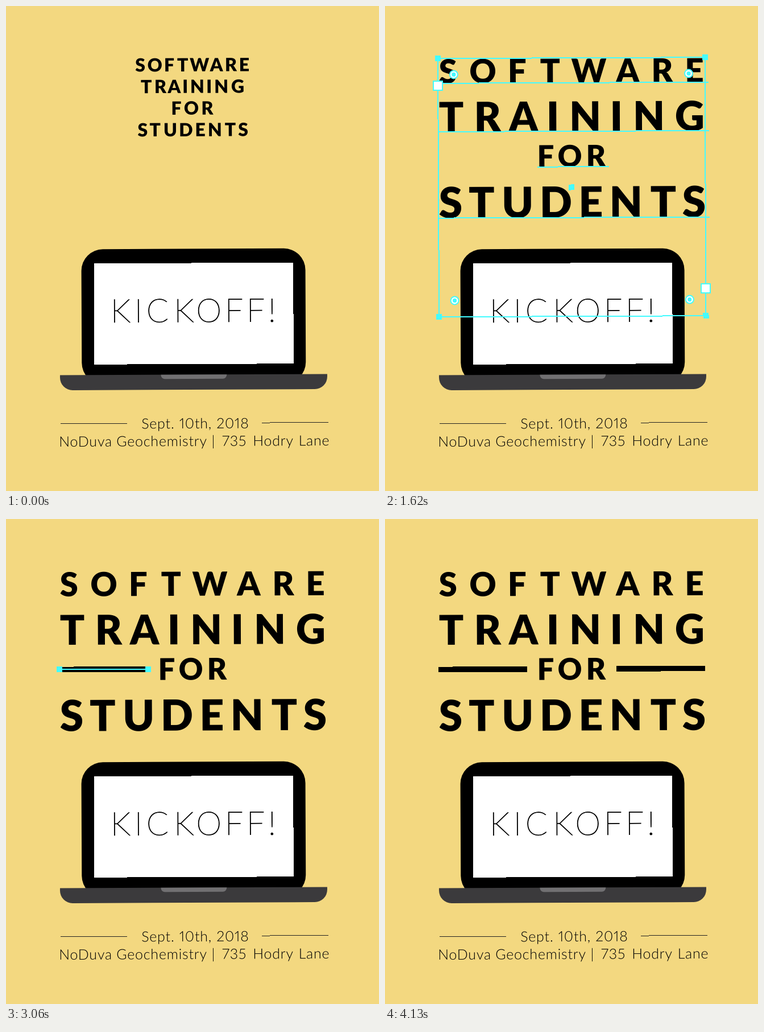
Recreate the animation shown at these times as an HTML page. Size 656 px wide and 852 px high, loop 4.56 s.

```html
<!DOCTYPE html>
<html lang="en">
<head>
<meta charset="utf-8">
<title>Software Training for Students</title>
<style>
  html, body { margin: 0; width: 100%; height: 100%; overflow: hidden; background: #f3d880; }
  svg { display: block; width: 656px; height: 852px; }
  text { font-family: Lato, "Open Sans", sans-serif; white-space: pre; }
  .foot {
    font-size: 25px; font-weight: 300; letter-spacing: .8px; text-anchor: middle;
    font-variant-numeric: proportional-nums;
  }
  .rule { stroke: #222; stroke-width: 1; }
  .guide { fill: none; stroke: #44fbff; stroke-width: 2; }
  .thin { stroke-width: 1.2; }
  .solid { fill: #44fbff; }
  .open { fill: #fff; stroke: #44fbff; stroke-width: 2; }
  .rule, .guide, rect.solid, rect.open, .crisp { shape-rendering: crispEdges; }
</style>
</head>
<body>
<svg viewBox="0 0 656 852" xmlns="http://www.w3.org/2000/svg">
  <g id="poster" transform="rotate(-.25 328 426)">
    <rect x="132.4" y="426.5" width="394" height="237.5" rx="38"/>
    <rect class="crisp" x="154.6" y="451.5" width="350.4" height="177.5" fill="#fff"/>
    <path d="M94 647.5H564V652A22 22 0 0 1 542 674H116A22 22 0 0 1 94 652Z" fill="#3b3a3c"/>
    <path d="M271.5 647.5H387.3V648A7 7 0 0 1 380.3 655H278.5A7 7 0 0 1 271.5 648Z" fill="#717072"/>
    <path class="rule" d="M94.7 732.6H211.7M448.7 732.6H565.7"/>
  </g>
</svg>
<script>
const LOOP = 4560;
const STEPS = [0, 640, 1620, 2600, 3360, 3700, 4130];
const poster = document.getElementById('poster');
const pen = document.createElement('canvas').getContext('2d');
const layers = [];

function add(parent, tag, attrs, content) {
  const el = document.createElementNS('http://www.w3.org/2000/svg', tag);
  for (const k in attrs) el.setAttribute(k, attrs[k]);
  if (content) el.textContent = content;
  parent.appendChild(el);
  return el;
}

// A group shown from step `first` through step `last`.
function layer(first, last) {
  const el = add(poster, 'g', {});
  layers.push({ el, first, last });
  return el;
}

// Sets each letter so that its ink is centred on the given x.
function letters(parent, word, centres, y, size, weight, extra) {
  pen.font = `${weight} ${size}px Lato, "Open Sans", sans-serif`;
  const xs = centres.map((c, i) => {
    const m = pen.measureText(word[i]);
    return (c - (m.actualBoundingBoxRight - m.actualBoundingBoxLeft) / 2).toFixed(2);
  });
  add(parent, 'text', { x: xs.join(' '), y, 'font-size': size, 'font-weight': weight, ...extra }, word);
}

const path = (g, d, cls = 'guide') => add(g, 'path', { class: cls, d });
const square = (g, x, y, size, cls) =>
  add(g, 'rect', { class: cls, x: x - size / 2, y: y - size / 2, width: size, height: size });

function port(g, x, y) {
  add(g, 'circle', { class: 'open', cx: x, cy: y, r: 7 });
  add(g, 'circle', { class: 'solid', cx: x, cy: y, r: 3.6 });
}

letters(poster, 'KICKOFF!', [203.5, 232.5, 266.5, 315, 356, 402.5, 440.5, 467], 555, 57, 100,
  { stroke: '#000', 'stroke-width': 1.1 });

[['Sept.', 266, 742], ['10th,', 332, 742], ['2018', 397.5, 742],
 ['NoDuva', 138.5, 773], ['Geochemistry', 272.5, 773], ['|', 363.5, 773],
 ['735', 400, 773], ['Hodry', 468.5, 773], ['Lane', 540.5, 773]
].forEach(([word, x, y]) => add(poster, 'text', { class: 'foot', x, y }, word));

// size, baseline, tracking added when justified, small-title scale, underlines before and after
const LINES = [
  { word: 'SOFTWARE', size: 58, y: 134.8, track: 13.1, scale: .536, under: [[140.3, 523.3], [94.3, 570.3]],
    at: [157.5, 206, 255, 298, 353.5, 408.5, 458.5, 501] },
  { word: 'TRAINING', size: 72, y: 220, track: 9.1, scale: .45, under: [[126, 539], [94, 571]],
    at: [149.5, 207, 258.5, 301, 348.5, 394.5, 442.5, 505] },
  { word: 'FOR', size: 52.5, y: 282.4, track: 0, scale: .62, under: [[268.6, 394.6], [268.6, 394.6]],
    at: [284.5, 326, 373.5] },
  { word: 'STUDENTS', size: 75, y: 371.6, track: 2.4, scale: .43, under: [[101.2, 564.2], [93.2, 571.2]],
    at: [124, 176.5, 237, 303.5, 362.5, 420.5, 484, 535] }
];

const small = layer(0, 0), large = layer(1, 1), wide = layer(2, 6);
const marks = [layer(1, 1), layer(2, 2)];

LINES.forEach(({ word, size, y, track, scale, under, at }, row) => {
  const mid = (word.length - 1) / 2;
  letters(small, word, at.map(x => 329 + (x - 329) * scale), 114.8 + 38 * row, 32, 900);
  letters(large, word, at, y, size, 900);
  letters(wide, word, at.map((x, i) => x + track * (i - mid)), y, size, 900);
  under.forEach(([a, b], i) => path(marks[i], `M${a} ${y}H${b}`));
});

// Text frame with its handles
const frame = layer(1, 2);
path(frame, 'M94.5 91.2H564V545.2H94.5Z');
for (const x of [94.5, 564]) for (const y of [91.2, 545.2]) square(frame, x, y, 10, 'solid');
for (const x of [122.2, 535.4]) for (const y of [119.5, 516.5]) port(frame, x, y);
square(frame, 328.8, 318.5, 10, 'solid');
square(frame, 93.8, 139, 16, 'open');
square(frame, 563.8, 497, 16, 'open');

// Bars beside FOR
const BAR_Y = 263.4;
[[94.7, 250.7, 3], [407.7, 563.7, 4]].forEach(([a, b, first]) => {
  const bar = layer(first, 6), core = layer(first, 5), ends = layer(first, 4);
  add(bar, 'rect', { class: 'crisp', x: a, y: BAR_Y - 4.8, width: b - a, height: 9.6 });
  path(core, `M${a} ${BAR_Y}H${b}`);
  for (const x of [a, b]) square(ends, x, BAR_Y, 10, 'solid');
});

// Bounding box around both bars
const box = layer(5, 5);
path(box, 'M94.7 247.2H564.2V279.2H94.7Z', 'guide thin');
for (const x of [94.7, 328.7, 564.2])
  for (const y of [247.2, BAR_Y, 279.2])
    if (x !== 328.7 || y !== BAR_Y) square(box, x, y, 10, 'open');

const start = performance.now();
let shown = -1;

function draw() {
  const t = (performance.now() - start) % LOOP;
  const step = STEPS.filter(s => s <= t).length - 1;
  if (step !== shown) {
    shown = step;
    for (const { el, first, last } of layers)
      el.style.display = step >= first && step <= last ? '' : 'none';
  }
  requestAnimationFrame(draw);
}
draw();
</script>
</body>
</html>
```
